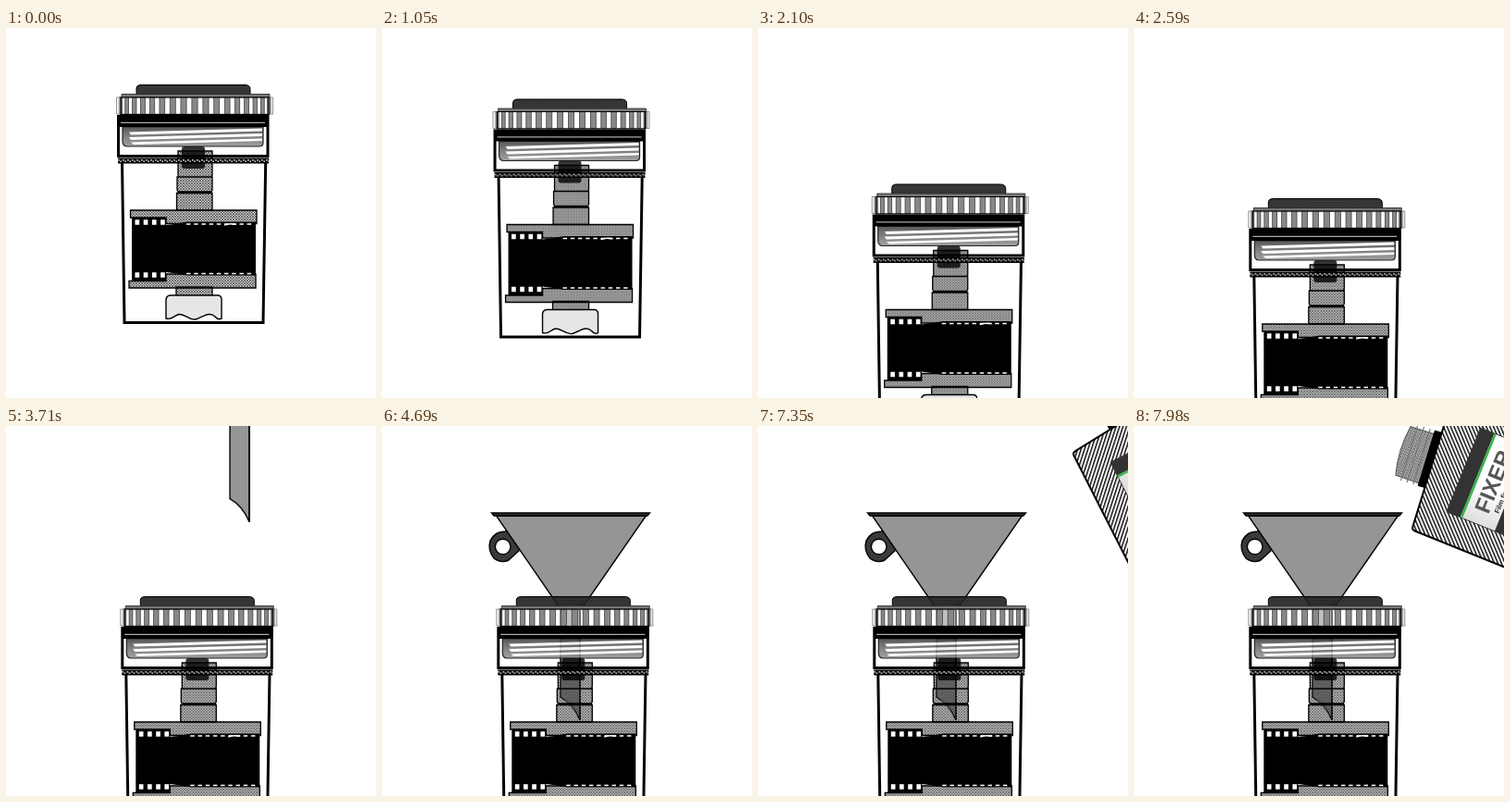
Recreate the animation shown at these times as an HTML page. Size 400x400 px, loop 8000 ms.

```html
<!DOCTYPE html>
<html lang="en">
<head>
<meta charset="utf-8">
<title>Pouring fixer</title>
<style>
  html, body { margin: 0; width: 100%; height: 100%; overflow: hidden; background: #fff; }
  svg { display: block; width: 100vw; height: 100vh; }
  .line { fill: none; stroke: #000; }
  .mesh { fill: url(#mesh); stroke: #000; stroke-width: 1.3; }
  text { font-family: "Liberation Sans", Arial, sans-serif; font-weight: bold; }
</style>
</head>
<body>
<svg viewBox="0 0 400 400">
  <defs>
    <pattern id="mesh" width="3" height="3" patternUnits="userSpaceOnUse">
      <rect width="3" height="3" fill="#000" opacity=".24"/>
      <path d="M0 0L3 3M3 0L0 3" stroke="#3a3a3a" stroke-width=".6"/>
    </pattern>
    <pattern id="grip" width="3" height="3" patternUnits="userSpaceOnUse">
      <rect width="3" height="3" fill="#2c2c2c"/>
      <path d="M0 0L3 3M3 0L0 3" stroke="#111" stroke-width=".8"/>
    </pattern>
    <pattern id="seam" width="5" height="6" y="140" patternUnits="userSpaceOnUse">
      <rect width="5" height="6" fill="#000"/>
      <path d="M1 2.2h1.8v1.3H1zM3.4 3.4h1.8v1.3H3.4z" fill="#fff"/>
    </pattern>
    <pattern id="hatch" width="3.55" height="3.55" patternUnits="userSpaceOnUse" patternTransform="rotate(45)">
      <rect width="3.55" height="3.55" fill="#fff"/>
      <rect width="1.5" height="3.55" fill="#111"/>
    </pattern>
    <linearGradient id="thread" x2="0" y2="1">
      <stop stop-color="#3c3c3c"/><stop offset=".5" stop-color="#6c6c6c"/><stop offset="1" stop-color="#909090"/>
    </linearGradient>
    <linearGradient id="paper">
      <stop stop-color="#ddd"/><stop offset=".4" stop-color="#fff"/>
    </linearGradient>
  </defs>

  <g id="funnel" stroke="#000" stroke-width="1.4">
    <path d="M150 133L137 145Q129 149 121 143Q114 134 117 124Q122 114 133 114L142 112.500z M139 130.500A8.300 8.300 0 1 0 122.400 130.500A8.300 8.300 0 1 0 139 130.500z" fill="#3a3a3a" fill-rule="evenodd"/>
    <path d="M123.500 97H285.500L221 190Q218 194 214 196V318Q207 301 193 293V196Q189 194 187 189z" fill="#949597"/>
    <path d="M214 196V318" stroke-width="1.8"/>
    <path d="M118.500 94H289.500L287 97H121z" fill="#333"/>
  </g>

  <g id="tank">
    <!-- beaker -->
    <path class="line" stroke-width="3" d="M125.500 144L128 318.500H278L280.700 144"/>

    <!-- column and base -->
    <path class="mesh" d="M184 280h39v10h-39z"/>
    <path d="M173 314V293Q174 289 178 289H229Q232.500 289 233 293V314Q229 316 226 312C220 306 214 312 205 315C197 316 194 309 187 309.500C181 311 180 316 173 314Z" fill="#e6e6e6" stroke="#000" stroke-width="1.4"/>
    <path class="mesh" d="M186 133h37v26l-1 2h-35l-1-2zM185 161h38v14l-1 2h-36l-1-2zM184.500 178.500h38.500V197h-38.500z"/>
    <path d="M190 131q0-3 3-3h19q3 0 3 3v18q0 3-3 3h-19q-3 0-3-3z" opacity=".8"/>

    <!-- reel with film -->
    <path class="mesh" d="M134.500 197H271V211.500H173V205H134.500z"/>
    <path class="mesh" d="M133 273.500H173V266H270V281H133z"/>
    <path d="M136 205H173V213Q184 212 196 209.500H270V267.500H196Q184 265 173 264V273.500H136z"/>
    <g stroke="#fff">
      <path d="M139.500 210h33M139.500 267h33" stroke-width="5.500" stroke-dasharray="4.700 4.500"/>
      <path d="M195 212h73M195 265.500h73" stroke-width="1.5" stroke-dasharray="4.500 3.700"/>
      <path d="M236 213q6-2 13-.8" stroke-width="1.4" fill="none"/>
    </g>

    <!-- lid -->
    <path d="M121.500 95.500H283V138.500H121.500z" class="line" stroke-width="3"/>
    <path d="M121 94.500H284V107H121z"/>
    <path d="M124 102.300H280" stroke="#aaa" stroke-width="1.2"/>
    <g opacity=".85">
      <path d="M126 107H278V124Q278 128 274 128H131Q126 128 126 122z" fill="url(#thread)" stroke="#000" stroke-width="1.2"/>
      <path d="M133 112.500L277 108.500V111.500L135 115.500zM133 118L277 114V117L135 121zM135 123.500L277 119.500V122L138 126z" fill="#fff"/>
    </g>
    <path d="M121 140.500H284V146.500H121z" fill="url(#seam)"/>
    <path d="M141 72V65Q141 62 145 61.500H259Q264 62 264 66V72z" fill="url(#grip)" fill-opacity=".9" stroke="#000"/>
    <path d="M125 71.500H285V75H125z" fill="#777" stroke="#222" stroke-width=".8"/>
    <path d="M119.500 75H288.500V93H119.500z" fill="#fff" fill-opacity=".4" stroke="#777" stroke-width=".8"/>
    <g id="ribs"></g>
    <path class="line" d="M124 75H284V93.500H124z" stroke-width="1.2"/>
  </g>

  <g id="bottle">
    <g transform="rotate(-5 51 -4)">
      <path d="M51 -38Q78 -44 106 -38V-11H50z" fill="url(#mesh)" stroke="#555"/>
      <path d="M47 -31h63M47 -24h63M47 -17h63" stroke="#777" stroke-width="1.2"/>
      <path d="M47 -12H110V-3H47z"/>
    </g>
    <path d="M4 0L158 -13Q162 -13 162 -9V263L154 272H9L0 264V4Q0 0 4 0z" fill="url(#hatch)" stroke="#000" stroke-width="2"/>
    <path d="M32 28H130V150H32z" fill="url(#paper)" stroke="#222" stroke-width=".8"/>
    <path d="M32 28H130V44H32zM32 84H130V150H32z" fill="#333"/>
    <path d="M32 44H130V46.500H32z" fill="#39b54a"/>
    <text x="46" y="71" font-size="24" fill="#555">FIXER</text>
    <text x="51" y="81" font-size="7.500" fill="#222">Film fixer</text>
  </g>
</svg>

<script>
  const LOOP = 8000, STEP = 70;
  const byId = id => document.getElementById(id);
  const tank = byId('tank'), funnel = byId('funnel'), bottle = byId('bottle');

  // Lid ribs narrow towards both sides.
  const ribX = i => 204 + 12 * i * (1 - 0.0026 * i * i);
  let ribs = '';
  for (let i = -8; i <= 8; i++) {
    const w = (ribX(i + 0.5) - ribX(i - 0.5)) * 0.52;
    ribs += `<rect x="${ribX(i) - w / 2}" y="75" width="${w}" height="18" fill="#888" stroke="#333" stroke-width=".7"/>`;
  }
  for (const x of [121.5, 285.5]) {
    ribs += `<rect x="${x}" y="75" width="1.5" height="18" fill="#aaa"/>`;
  }
  byId('ribs').innerHTML = ribs;

  // cubic-bezier(.4, 0, .6, 1)
  function ease(x) {
    let lo = 0, hi = 1;
    for (let i = 0; i < 24; i++) {
      const s = (lo + hi) / 2, r = 1 - s;
      if (1.2 * r * r * s + 1.8 * r * s * s + s * s * s < x) lo = s; else hi = s;
    }
    return lo * lo * (3 - 2 * lo);
  }
  const between = (t, from, to) => t <= from ? 0 : t >= to ? 1 : ease((t - from) / (to - from));
  const place = (el, x, y, turn = 0) => el.setAttribute('transform', `translate(${x} ${y}) rotate(${turn})`);

  function draw(now) {
    const t = Math.floor((now % LOOP) / STEP) * STEP;

    const sink = between(t, 560, 2590);
    place(tank, 4.3 * sink, 123 * sink);

    const above = 1 - between(t, 2870, 4690);
    place(funnel, 87 * above, -380 * above);

    const aside = 1 - between(t, 4690, 6510);
    const tilt = between(t, 6860, 7980);
    place(bottle, 366 + 310 * aside - 66 * tilt, -26 + 138 * tilt, -68 * tilt);
  }

  const start = performance.now();
  function tick() {
    draw(performance.now() - start);
    requestAnimationFrame(tick);
  }
  tick();
</script>
</body>
</html>
```
